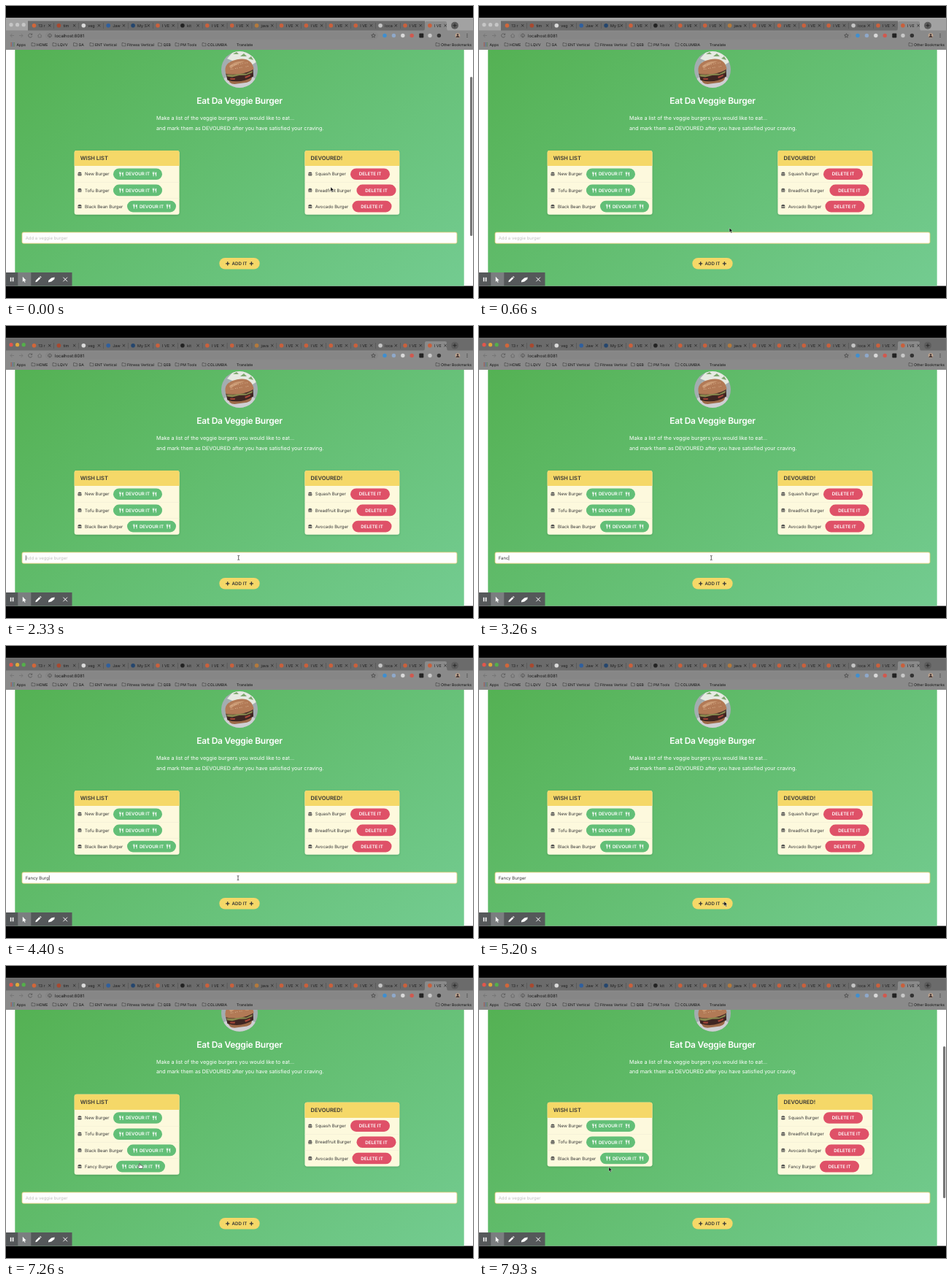
An HTML page for the animation above (8000 ms loop, 640x400 px).

```html
<!DOCTYPE html>
<html lang="en">
<head>
<meta charset="utf-8">
<title>Eat Da Veggie Burger</title>
<style>
  html, body { margin: 0; width: 100%; height: 100%; overflow: hidden; background: #000; }
  svg { display: block; width: 100%; height: 100%; }
  text { font-family: Inter, "Open Sans", sans-serif; white-space: pre; text-rendering: geometricPrecision; }
</style>
</head>
<body>
<svg id="stage" viewBox="0 0 640 400">
  <defs>
    <linearGradient id="green" gradientUnits="userSpaceOnUse" x1="100" y1="-20" x2="540" y2="506">
      <stop offset="0" stop-color="#54b153"/><stop offset="1" stop-color="#75cd94"/>
    </linearGradient>
    <clipPath id="view"><rect y="60" width="640" height="323.5"/></clipPath>
    <clipPath id="dish"><circle cx="320" cy="87" r="25"/></clipPath>
    <filter id="soft" x="-10%" y="-10%" width="120%" height="130%">
      <feDropShadow dx="0" dy="1" stdDeviation="1.8" flood-opacity=".16"/>
    </filter>
    <g id="burger" fill="#4a4a4a">
      <path d="M-2.6-.7a2.6 2 0 0 1 5.2 0z"/>
      <path d="M-2.7-.2h5.4v.8h-5.4zM-2.6 1.1h5.2v.5q0 .8-.8.8h-3.6q-.8 0-.8-.8z"/>
    </g>
    <g id="cutlery" fill="#fff">
      <path d="M-2.7-3v2q0 1 .8 1.2v2.8h.9V.2q.8-.2.8-1.2v-2h-.5v1.8h-.4v-1.8h-.5v1.8h-.4v-1.8z"/>
      <path d="M2.6-3Q.8-2.6.8.5h.9V3h.9z"/>
    </g>
    <path id="plus" d="M-2.6 0h5.2M0-2.6v5.2" stroke="#363636" stroke-width="1.3"/>
    <path id="arrow" d="M0 0v5.9l1.4-1.2 1 2.2 1-.5-1-2.1h1.9z" stroke="#fff" stroke-width=".4"/>
    <path id="ibeam" d="M-1.3-3q1.3 0 1.3.7 0-.7 1.3-.7M0-2.3v4.6M-1.3 3q1.3 0 1.3-.7 0 .7 1.3.7" fill="none" stroke="#222" stroke-width=".7"/>
    <path id="hand" d="M-1.4-3.2q.7-.7 1.3 0v2l3 .7q.9.3.7 1.3l-.7 2.7h-4l-2.3-3q0-.8.8-.7l1.2.8z" fill="#fff" stroke="#222" stroke-width=".6"/>
  </defs>
  <g id="page" clip-path="url(#view)"></g>
  <g id="chrome"></g>
  <g id="tools"></g>
  <use id="cursor"/>
</svg>
<script>
const LOOP = 8000, ADDED = 5600, EATEN = 7530;
const FOCUS = 900, TYPE = 2630, KEY = 190, WORD = 'Fancy Burger';
const $ = id => document.getElementById(id);

const text = (x, cy, s, size, fill = '#363636', weight = 400, anchor = 'start') =>
  `<text x="${x}" y="${cy + size * .36}" font-size="${size}" fill="${fill}" font-weight="${weight}" text-anchor="${anchor}">${s}</text>`;
const rect = (x, y, w, h, fill, r = 0, more = '') =>
  `<rect x="${x}" y="${y}" width="${w}" height="${h}" rx="${r}" fill="${fill}" ${more}/>`;
const dot = (x, y, r, fill) => `<circle cx="${x}" cy="${y}" r="${r}" fill="${fill}"/>`;
const line = (d, stroke = '#333', w = .8) => `<path d="${d}" fill="none" stroke="${stroke}" stroke-width="${w}"/>`;
const use = (id, x, y) => `<use href="#${id}" x="${x}" y="${y}"/>`;

// Each row: name, left edge of its button
const wishes = [['New Burger', 147], ['Tofu Burger', 147], ['Black Bean Burger', 166]];
const eaten = [['Squash Burger', 472], ['Breadfruit Burger', 480.5], ['Avocado Burger', 474.5]];

function card(x, w, mid, title, rows, devoured) {
  const pitch = 22.2, head = 21.2, h = head + pitch * rows.length, top = mid - h / 2;
  let s = `<g filter="url(#soft)">${rect(x, top, w, h, '#fdf9dd', 3)}</g>` +
    `<path d="M${x} ${top + head}v${3 - head}q0-3 3-3h${w - 6}q3 0 3 3v${head - 3}z" fill="#f5d868"/>` +
    text(x + 8, top + 10.8, title, 7.5, '#363636', 600);
  rows.forEach(([name, bx], i) => {
    const y = top + head + pitch * (i + .5);
    if (i) s += rect(x, y - pitch / 2, w, .5, '#efead2');
    s += use('burger', x + 7.3, y) + text(x + 14.3, y, name, 6, '#363636');
    if (devoured) {
      s += rect(bx, y - 7.8, 54, 15.6, '#df5168', 7.8) + text(bx + 27, y, 'DELETE IT', 6.2, '#fff', 600, 'middle');
    } else {
      s += rect(bx, y - 7.8, 67, 15.6, '#63bf77', 7.8) + text(bx + 33.5, y, 'DEVOUR IT', 6.2, '#fff', 600, 'middle') +
        use('cutlery', bx + 11, y) + use('cutlery', bx + 56.5, y);
    }
  });
  return s;
}

function photo() {
  let seeds = '';
  for (let i = 0; i < 18; i++)
    seeds += dot(306 + (i * 7.3) % 28, 77 + (i * 3.7) % 10, .5, '#e3c3a0');
  return `<g clip-path="url(#dish)">${rect(295, 62, 50, 50, '#a3adb0')}
    <path d="M303 72l9-10h22l10 14-12 8z" fill="#e6eae2"/><path d="M311 66l5-3 3 3zM321 69l5-4 4 4zM332 72l4-3 3 5z" fill="#7fa970"/>
    <ellipse cx="320" cy="104" rx="24" ry="10" fill="#cfcfd3"/>
    <g transform="rotate(-8 320 90)">
      <path d="M303 96h33q1 9-8 10h-17q-8-1-8-10z" fill="#9c6a48"/>
      <path d="M301 89q19 6 38 0l-1 10q-18 8-36 0z" fill="#3f2522"/>
      <path d="M302 91l9 2 8-1 10 2 9-3-1 3-9 2-9-1-10 1-7-2z" fill="#87864d"/>
      <path d="M306 97l7 1-1 2-6-1zM326 98l8-2v2l-7 2z" fill="#a5463a"/>
      <path d="M301 90q-2-16 18-17 20-1 21 16-8 4-20 4-12 0-19-3z" fill="#b27a56"/>
      <path d="M307 81q8-7 22-4-12 2-20 7z" fill="#cb9a74"/>
    </g>${seeds}</g>`;
}

function drawPage(stage) {
  const wish = stage === 1 ? [...wishes, [WORD, 151]] : wishes;
  const done = stage === 2 ? [...eaten, [WORD, 467]] : eaten;
  const up = stage ? 22.3 : 0, mid = stage ? 230.7 : 241.8;
  $('page').innerHTML = rect(0, 60, 640, 324, '#fff') + rect(12.3, 60, 615.4, 324, 'url(#green)') +
    `<g transform="translate(0 ${-up})">${photo()}
    <g letter-spacing="-.25">${text(320, 130, 'Eat Da Veggie Burger', 12, '#fff', 600, 'middle')}</g>` +
    text(206, 153.3, 'Make a list of the veggie burgers you would like to eat...', 7.2, '#fff') +
    text(206, 167, 'and mark them as DEVOURED after you have satisfied your craving.', 7.2, '#fff') + '</g>' +
    card(93.7, 143.8, mid, 'WISH LIST', wish, false) +
    card(409.5, 129.7, mid, 'DEVOURED!', done, true) +
    rect(22, 310, 596, 15.2, '#fefefe', 2, 'stroke="#e9cf7c" stroke-width=".8"') +
    '<g id="field"></g>' +
    rect(292.3, 345, 55.4, 15.6, '#f5d868', 7.8) + text(320, 352.8, 'ADD IT', 6.2, '#363636', 600, 'middle') +
    use('plus', 303.7, 352.8) + use('plus', 336.4, 352.8) +
    rect(636, stage ? 110 : 97, 3.2, stage ? 208 : 218, '#777', 1.6, 'id="bar"');
}

function drawChrome(active) {
  const or = '#c9603c', gray = '#c4c4c4';
  const tabs = [['13 r', '#d0663a'], ['tim', '#a8492f'], ['veg', '#dadada'], ['Jaw', '#2f5f9e'], ['My S', '#24466e'],
    ['I VE', or], ['kit', '#222'], ['I VE', or], ['I VE', or], ['java', '#b3793c'], ['I VE', or], ['I VE', or],
    ['I VE', or], ['I VE', or], ['loca', gray], ['I VE', or], ['I VE', or]];
  let s = rect(0, 16, 640, 18, active ? '#6b6b6b' : '#a2a2a2') + rect(30, 20.5, 544, 13.5, '#6b6b6b') +
    rect(0, 33.5, 640, 26.5, '#8a8a8a');
  ['#e2574c', '#dfa83a', '#54b04a'].forEach((c, i) => s += dot(7 + i * 8.6, 25.7, 2.6, active ? c : '#c6c6c6'));
  tabs.forEach(([name, color], i) => {
    const x = 38.5 + i * 33.9;
    if (i === tabs.length - 1)
      s += '<path d="M572 34q2-1 2-4v-7q0-2 2-2h26q2 0 2 2v7q0 3 2 4z" fill="#8a8a8a"/>';
    else s += rect(x + 27, 23, .5, 8, '#4c4c4c');
    s += dot(x, 26.7, 2.8, color) + text(x + 6, 26.7, name, 5.4, '#1d1d1d') +
      line(`M${x + 19.5} 25l3.4 3.4m0-3.4l-3.4 3.4`, '#222', .7);
  });
  s += dot(615, 26.7, 5, '#5c5c5c') + line('M612.4 26.7h5.2m-2.6-2.6v5.2', '#1d1d1d');
  s += line('M11 40.5H6m2.3-2.4L6 40.5l2.3 2.4', '#727272') + line('M18 40.5h5m-2.3-2.4l2.3 2.4-2.3 2.4', '#727272') +
    line('M35.4 39a2.6 2.6 0 1 0 .3 2.4M35.7 37.6v1.8h-1.8', '#555') + line('M43.3 40.7l2.9-2.6 2.9 2.6M44.2 40.2v2.8h4v-2.8', '#666') +
    rect(54, 35.5, 456, 10, '#868686', 5) + line('M60 38.2a2.3 2.3 0 1 0 .1 0M60 40.2v1.6', '#333', .6) +
    text(67, 40.5, 'localhost:8081', 5.9, '#151515');
  s += '<path d="M503.5 37.7l.8 1.9 2 .2-1.5 1.3.4 2-1.7-1-1.7 1 .4-2-1.5-1.3 2-.2z" fill="none" stroke="#333" stroke-width=".6"/>';
  ['#3f8fd0', '#8fa8c9', '#d8d8d8', '#d0594f', '#222', '#c7c7c7', '#333'].forEach((c, i) =>
    s += i === 4 ? rect(566.3, 37.6, 6, 6, c, 1) : dot(519 + i * 12.4, 40.5, 2.7, c));
  s += dot(619, 40.5, 3.3, '#bfa58f') + '<path d="M616.4 43q.2-2.1 2.6-2.1t2.6 2.1z" fill="#3d3030"/>' + dot(619, 39.5, 1.3, '#3d3030');
  [38.5, 40.5, 42.5].forEach(y => s += dot(632, y, .6, '#222'));
  for (let i = 0; i < 9; i++) s += rect(6.5 + i % 3 * 2, 50 + Math.floor(i / 3) * 2, 1.3, 1.3, ['#a94b3f', '#476d9c', '#54804d'][i % 3]);
  s += text(14.5, 52.7, 'Apps', 5.1, '#111');
  [[42, 'HOME'], [71, 'LQVV'], [99.5, 'GA'], [122, 'ENT Vertical'], [166, 'Fitness Vertical'], [215.5, 'QEB'],
    [239, 'PM Tools'], [276, 'COLUMBIA'], [316, 'Translate'], [596, 'Other Bookmarks']].forEach(([x, name]) => {
    if (name !== 'Translate') s += line(`M${x - 7} 50.5h2l.6.7h2.4v3.6h-5z`, '#444', .6);
    s += text(x, 52.7, name, 5.1, '#111');
  });
  $('chrome').innerHTML = s;
}

function drawTools() {
  $('tools').innerHTML = rect(0, 365, 90.5, 18.5, '#55585a') + rect(16.3, 365, 18, 18.5, '#7b7e80') +
    rect(5.8, 371.8, 1.6, 5.6, '#fff') + rect(8.8, 371.8, 1.6, 5.6, '#fff') +
    '<path d="M22.8 370.8v7l1.6-1.4 1.2 2.4 1.1-.5-1.2-2.4h2.1z" fill="#fff"/>' +
    '<path d="M40.3 378.2l.5-2.2 4.8-4.8 1.7 1.7-4.8 4.8zM46.2 370.6l.8-.6 1.6 1.6-.7.8z" fill="#fff"/>' +
    '<path d="M58.2 376l4-3.4 4.5-1.2-.4 2.8-4 3.4-4.3 1z" fill="#fff"/>' +
    line('M78.4 371.7l5.6 5.6m0-5.6l-5.6 5.6', '#fff', 1);
}

const path = [[0, 445, 248], [100, 445, 248], [880, 319, 317.3], [4720, 318, 317.7], [5180, 336, 350], [5230, 336, 350],
  [5460, 302, 352.5], [6400, 302, 352.5], [7260, 184, 274], [7600, 184, 274], [7900, 178, 275.5]];

function cursorAt(t) {
  const i = path.findIndex(p => p[0] > t);
  if (i < 0) return path[path.length - 1].slice(1);
  const [a, b] = [path[i - 1], path[i]], u = (t - a[0]) / (b[0] - a[0]), e = u * u * (3 - 2 * u);
  return [a[1] + (b[1] - a[1]) * e, a[2] + (b[2] - a[2]) * e];
}

function drawField(t) {
  const n = t < TYPE || t >= ADDED ? 0 : Math.min(WORD.length, Math.floor((t - TYPE) / KEY) + 1);
  const typed = WORD.slice(0, n), end = TYPE + KEY * (WORD.length - 1);
  const field = $('field');
  field.innerHTML = n ? text(26.7, 317.7, typed, 6) : text(26.7, 317.7, 'Add a veggie burger', 6, '#c2c2c0');
  const since = t < TYPE ? t - FOCUS : Math.max(0, t - end);
  if (t >= FOCUS && t < ADDED && since % 1000 < 450) {
    const x = 26.9 + (n ? field.firstChild.getComputedTextLength() : 0);
    field.innerHTML += rect(x, 314.3, .6, 6.8, '#222');
  }
}

let shown, wasActive;
function frame(now) {
  const t = now % LOOP, stage = t < ADDED ? 0 : t < EATEN ? 1 : 2, active = t >= FOCUS;
  if (stage !== shown) drawPage(shown = stage);
  if (active !== wasActive) drawChrome(wasActive = active);
  drawField(t);

  const age = stage === 0 ? t + 400 : t - (stage === 1 ? ADDED : EATEN);
  $('bar').setAttribute('opacity', Math.max(0, Math.min(1, (650 - age) / 180)));

  const [x, y] = cursorAt(t);
  const overField = y > 310 && y < 325 && x > 22;
  const overButton = t > 5260 && t < EATEN && (y > 345 && x < 348 || y < 282.5 && x < 218);
  $('cursor').setAttribute('href', overField ? '#ibeam' : overButton ? '#hand' : '#arrow');
  $('cursor').setAttribute('transform', `translate(${x} ${y})`);
}

drawTools();
const start = performance.now();
(function tick() {
  frame(performance.now() - start);
  requestAnimationFrame(tick);
})();
</script>
</body>
</html>
```
